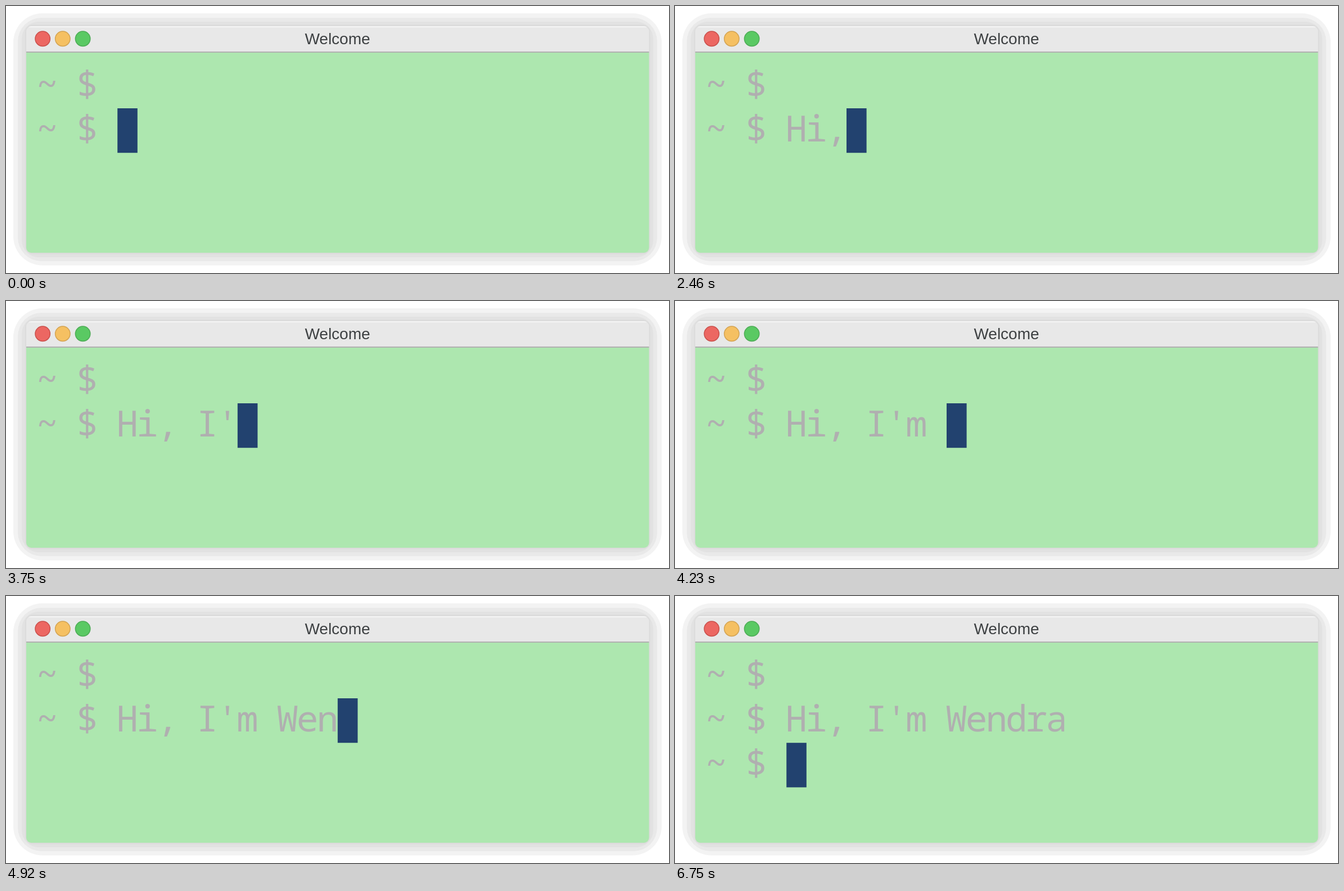
These frames come from a looping animation (1179x475 px, 8.26 s). An HTML page:

```html
<!DOCTYPE html>
<html lang="en">
<head>
<meta charset="utf-8">
<title>Welcome</title>
<style>
  html, body { margin: 0; width: 100%; height: 100%; overflow: hidden; background: #fff; }
  svg { display: block; width: 100%; height: 100%; }
  .title { font: 28px "Liberation Sans", Arial, sans-serif; fill: #3d4042; text-anchor: middle; }
  .line {
    font: 64.4px "Noto Sans Mono", monospace;
    letter-spacing: -3.04px;
    fill: #b0afb0;
    white-space: pre;
  }
  .button { stroke-width: 1.5; }
</style>
</head>
<body>
<svg viewBox="0 0 1179 475">
  <defs>
    <clipPath id="frame"><rect x="36" y="36" width="1107.5" height="403" rx="9"/></clipPath>
  </defs>

  <!-- Stepped window shadow -->
  <rect x="13" y="13" width="1153" height="448.5" rx="52" fill="#f3f3f3"/>
  <rect x="21" y="21" width="1137" height="433" rx="42" fill="#e9e9e9"/>
  <rect x="28" y="28" width="1123" height="419" rx="30" fill="#e2e2e2"/>
  <rect x="34" y="33" width="1111.5" height="408.5" rx="14" fill="#dcdcdc"/>

  <g clip-path="url(#frame)">
    <rect x="36" y="36" width="1108" height="46" fill="#e8e8e8"/>
    <rect x="36" y="36" width="1108" height="2" fill="#f6f6f6"/>
    <rect x="36" y="81" width="1108" height="2" fill="#b1b0b1"/>
    <rect x="36" y="83" width="1108" height="357" fill="#ade7af"/>
  </g>

  <g class="button">
    <circle cx="65.2" cy="58.3" r="13.2" fill="#ec6762" stroke="#c9504b"/>
    <circle cx="100.8" cy="58.3" r="13.2" fill="#f5c062" stroke="#d3a352"/>
    <circle cx="136.6" cy="58.3" r="13.2" fill="#5ac963" stroke="#4dab55"/>
  </g>
  <text class="title" x="589.5" y="68">Welcome</text>

  <text class="line" x="54.1" y="161.8">~ $</text>
  <text class="line" x="54.1" y="241" id="typed">~ $</text>
  <text class="line" x="54.1" y="320.2" id="next">~ $</text>
  <rect id="cursor" width="35.6" height="79.2" fill="#22426f"/>
</svg>

<script>
  const LOOP = 8260, ENTER = 6750;
  const CELL = 35.6, ROW = 79.2, LEFT = 55.8, TOP = 182;
  const PROMPT = "~ $ ";
  const MESSAGE = "Hi, I'm Wendra";
  const KEY_TIMES = [2000, 2170, 2460, 2660, 3410, 3750, 4030, 4230,
                     4660, 4780, 4920, 5070, 5150, 5240];

  const typed = document.getElementById("typed");
  const next = document.getElementById("next");
  const cursor = document.getElementById("cursor");

  function draw() {
    const time = performance.now() % LOOP;
    const count = KEY_TIMES.filter(t => t <= time).length;
    const entered = time >= ENTER;
    const column = PROMPT.length + (entered ? 0 : count);

    typed.textContent = PROMPT + MESSAGE.slice(0, count);
    next.setAttribute("visibility", entered ? "visible" : "hidden");
    cursor.setAttribute("x", LEFT + column * CELL);
    cursor.setAttribute("y", TOP + (entered ? ROW : 0));
    requestAnimationFrame(draw);
  }
  draw();
</script>
</body>
</html>
```
